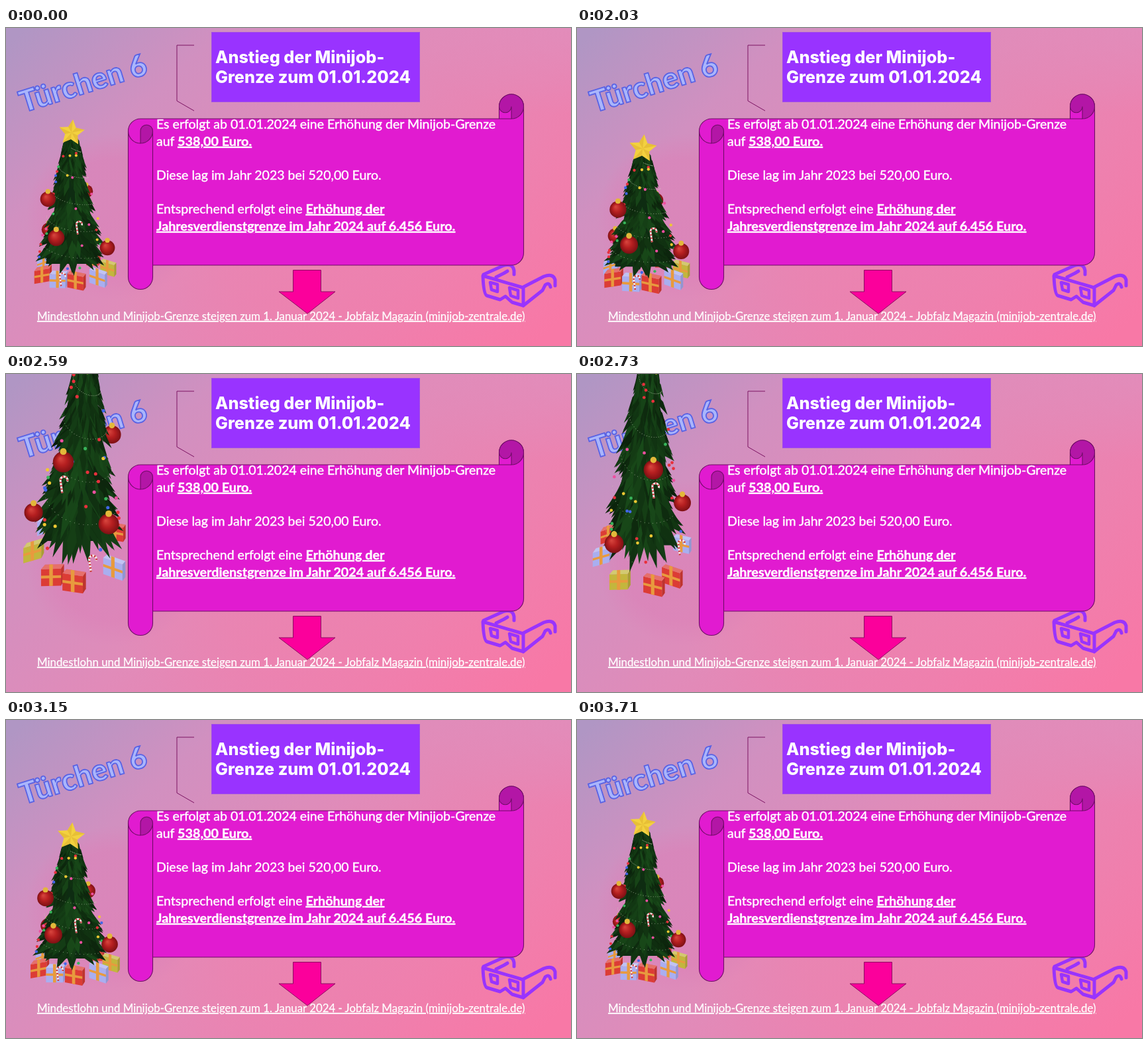
These frames come from a looping animation (853x480 px, 5.18 s). An HTML page with a canvas:

```html
<!DOCTYPE html>
<html lang="de">
<head>
<meta charset="utf-8">
<title>Türchen 6</title>
<style>
html, body { margin: 0; width: 100%; height: 100%; overflow: hidden; }
body {
  position: relative;
  background:
    radial-gradient(ellipse 135px 125px at 165px 285px, #dc7fb788 70%, #dc7fb700),
    radial-gradient(ellipse 250px 150px at 410px 370px, #f07fac66 30%, #f07fac00),
    radial-gradient(ellipse 260px 130px at 853px 0, #dd92c088, #dd92c000),
    linear-gradient(138deg, #b096c4 2%, #d190c0 24%, #e18bb9 48%, #ec82b0 70%, #f878a6 96%);
}
svg, canvas { position: absolute; left: 0; top: 0; width: 853px; height: 480px; }
text { fill: #fff; font-family: Lato, "Open Sans", sans-serif; white-space: pre; }
.title text { font: 800 25.2px Inter, sans-serif; }
.body { font-size: 19.55px; stroke: #fff; stroke-width: 0.4; }
.key { font-size: 19.75px; font-weight: 700; }
.key, .link { text-decoration: underline; text-decoration-skip-ink: none; }
.link { font-size: 16.83px; stroke: #fff; stroke-width: 0.25; }
.door { font-size: 45px; font-weight: 800; fill: #a9b5fc; stroke: #5862e4; stroke-width: 1.8; }
</style>
</head>
<body>
<svg viewBox="0 0 853 480">
  <text class="door" transform="translate(26 128) rotate(-17.3)">Türchen 6</text>
  <path d="M284 26H258V110L284 125" fill="none" stroke="#7c1463"/>
  <g class="title">
    <rect x="310.5" y="6.5" width="314" height="105" fill="#9933ff" stroke="#a04de6"/>
    <text x="316" y="53">Anstieg der Minijob-</text>
    <text x="316" y="82.5">Grenze zum 01.01.2024</text>
  </g>
  <g fill="none" stroke="#9933ff" stroke-width="5" stroke-linejoin="round" stroke-linecap="round">
    <path d="M720 374L781 392V419L764 414L754 405L746 410L726 404Q721 402 720 374Z"/>
    <path d="M781 391L812 375Q826 370 829 380V389M781 419L810 396L814 388Q820 383 822 391"/>
    <path d="M721 372L750 359Q765 354 767 366V372M740 376L752 370L757 367"/>
    <path d="M731 384L742 387V398L733 395ZM760 392L773 396V408L762 404Z" stroke-width="4.5"/>
  </g>
  <g stroke="#6f0d66" stroke-width="1.1">
    <path fill="#e11bd0" d="M184.5 155.5a18.5 18.5 0 0 1 18.5-18.5H744.5V118.5a18.5 18.5 0 0 1 37 0V339.5a18.5 18.5 0 0 1-18.5 18.5H221.5V376a18.5 18.5 0 0 1-37 0Z"/>
    <path fill="none" d="M184.5 155.5a18.5 18.5 0 0 0 18.5 18.5M221.5 155.5V358M744.5 137H763"/>
    <path fill="#b316a6" d="M203 155.5a9.25 9.25 0 0 1 18.5 0a18.5 18.5 0 0 1-18.5 18.5Z"/>
    <path fill="#b316a6" d="M744.5 118.5a18.5 18.5 0 0 1 37 0a18.5 18.5 0 0 1-18.5 18.5V118.5a9.25 9.25 0 0 1-18.5 0Z"/>
  </g>
  <g class="body">
    <text x="227" y="152">Es erfolgt ab 01.01.2024 eine Erhöhung der Minijob-Grenze</text>
    <text x="227" y="178">auf <tspan class="key">538,00 Euro.</tspan></text>
    <text x="227" y="229">Diese lag im Jahr 2023 bei 520,00 Euro.</text>
    <text x="227" y="280">Entsprechend erfolgt eine <tspan class="key">Erhöhung der</tspan></text>
    <text x="227" y="306" class="key">Jahresverdienstgrenze im Jahr 2024 auf 6.456 Euro.</text>
  </g>
  <path d="M433.5 365.5H475.5V398H497L455 431L412 398H433.5Z" fill="#fb009b" stroke="#8d0c62"/>
  <text class="link" x="47" y="441">Mindestlohn und Minijob-Grenze steigen zum 1. Januar 2024 - Jobfalz Magazin (minijob-zentrale.de)</text>
</svg>
<canvas width="853" height="480"></canvas>
<script>
const ctx = document.querySelector('canvas').getContext('2d');
const LOOP = 5180, START = 1610, STEP = 70, END = 3710, RAD = Math.PI / 180;

// time, top x, top y, base x, base y, half width, tilt, yaw
const POSES = [
  [1540, 99, 158, 100, 356, 53, 18, 0],
  [1990, 99, 181, 100, 360, 57, 18, 2],
  [2100, 100, 170, 100, 356, 57, 20, 25],
  [2310, 103, 41, 102, 310, 62, 32, 140],
  [2590, 121, -45, 107, 252, 67, 50, 180],
  [2870, 95, 0, 90, 282, 56, 45, 285],
  [3150, 98, 176, 100, 360, 57, 18, 357],
  [3240, 99, 182, 100, 360, 58, 18, 360],
  [3710, 99, 158, 100, 356, 53, 18, 360]
];

// Cubic Hermite through the pose table.
function poseAt(t) {
  const last = POSES.length - 1;
  let i = 0;
  while (i < last - 1 && t >= POSES[i + 1][0]) i++;
  const a = POSES[i], b = POSES[i + 1], span = b[0] - a[0], s = (t - a[0]) / span;
  const slope = (n, k) => n < 1 || n >= last ? 0 :
    (POSES[n + 1][k] - POSES[n - 1][k]) / (POSES[n + 1][0] - POSES[n - 1][0]);
  const mix = k => (1 + 2 * s) * (1 - s) ** 2 * a[k] + s * s * (3 - 2 * s) * b[k] +
    span * (s * (1 - s) ** 2 * slope(i, k) + s * s * (s - 1) * slope(i + 1, k));
  const [topX, topY, baseX, baseY, width, tilt, yaw] = [1, 2, 3, 4, 5, 6, 7].map(mix);
  return { topX, topY, baseX, baseY, width, tilt, yaw };
}

let seed = 24;
const rnd = () => (seed = seed * 16807 % 2147483647) / 2147483647;
const radiusAt = u => Math.max(u, 0) ** 0.7;

const branches = Array.from({ length: 420 }, (_, i) => ({
  u: 1 - 0.94 * i / 420, angle: rnd() * 360, reach: 0.75 + 0.35 * rnd(), tone: rnd()
}));
const bulbColors = ['#e8303c', '#4166e8', '#f0c832', '#38b45a', '#ee4fa0', '#e8303c'];
const bulbs = Array.from({ length: 60 }, (_, i) => ({
  u: 0.1 + 0.85 * rnd() ** 0.8, angle: rnd() * 360, color: bulbColors[i % 6]
}));
// angle, height
const balls = [[-75, 0.49], [-30, 0.73], [85, 0.87], [145, 0.5], [225, 0.8]];
const canes = [[15, 0.65], [-15, 1.02], [150, 0.6], [200, 0.95]];
const [RED, LILAC, OLIVE] = ['#dc3c35', '#a9aef0', '#c3b63d'];
const gifts = [[-60, RED], [-25, LILAC], [5, RED], [45, LILAC], [95, OLIVE], [145, RED], [175, RED], [235, LILAC]];

function project(p, angle, u, r) {
  const a = (angle + p.yaw) * RAD, depth = Math.cos(a);
  return {
    x: p.topX + (p.baseX - p.topX) * u + Math.sin(a) * r * p.width,
    y: p.topY + (p.baseY - p.topY) * u + depth * r * p.tilt,
    depth
  };
}

function poly(points, fill) {
  ctx.beginPath();
  points.forEach(([x, y]) => ctx.lineTo(x, y));
  ctx.closePath();
  ctx.fillStyle = fill;
  ctx.fill();
}

function dot(x, y, r, fill) {
  ctx.beginPath();
  ctx.arc(x, y, r, 0, 7);
  ctx.fillStyle = fill;
  ctx.fill();
}

function drawGift(p, angle, color) {
  const { x, y, depth } = project(p, angle, 1.04, 1);
  const s = p.width * (0.2 + 0.03 * depth);
  ctx.save();
  ctx.translate(x, y);
  ctx.transform(1, 0.35 * Math.sin((angle + p.yaw + 30) * RAD), 0, 1, 0, 0);
  const lid = [[-s, -s * 0.7], [-s * 0.6, -s * 1.15], [s * 1.3, -s * 1.15], [s, -s * 0.7]];
  const side = [[s, -s * 0.7], [s * 1.3, -s * 1.15], [s * 1.3, s * 0.5], [s, s]];
  ctx.fillStyle = color;
  ctx.fillRect(-s, -s * 0.7, s * 2, s * 1.7);
  poly(lid, color);
  poly(lid, '#ffffff44');
  poly(side, color);
  poly(side, '#00000022');
  ctx.fillStyle = '#e89a3e';
  ctx.fillRect(-s * 0.18, -s * 1.15, s * 0.36, s * 2.15);
  ctx.fillRect(-s, -s * 0.05, s * 2, s * 0.28);
  ctx.restore();
}

function drawBall(p, [angle, u]) {
  const { x, y, depth } = project(p, angle, u, radiusAt(u) + 0.1);
  const r = p.width * 0.212 * (1 + 0.13 * depth);
  const shade = ctx.createRadialGradient(x - r * 0.3, y - r * 0.35, 0, x, y, r);
  shade.addColorStop(0, '#d9473f');
  shade.addColorStop(0.5, '#b51f20');
  shade.addColorStop(1, '#7d1014');
  dot(x, y, r, shade);
  dot(x, y - r, r * 0.32, '#e3b83a');
}

function drawBranch(p, b) {
  const r = radiusAt(b.u) * b.reach;
  const tip = project(p, b.angle, b.u, r);
  const root = project(p, b.angle, b.u - 0.13, r * 0.3);
  const dx = tip.x - root.x, dy = tip.y - root.y, len = Math.hypot(dx, dy) || 1;
  const w = p.width * (0.045 + 0.07 * b.u);
  const nx = -dy / len * w, ny = dx / len * w;
  const mx = root.x + dx * 0.5, my = root.y + dy * 0.5;
  const light = 8 + 9 * b.tone + 3 * tip.depth;
  poly([[root.x, root.y], [mx + nx, my + ny], [tip.x, tip.y], [mx - nx, my - ny]], `hsl(121 50% ${light}%)`);
}

function drawCane(p, [angle, u]) {
  const { x, y, depth } = project(p, angle, u, radiusAt(u) + 0.05);
  if (depth < 0) return;
  const s = p.width * 0.08;
  ctx.beginPath();
  ctx.moveTo(x - s * 0.5, y + s * 2.6);
  ctx.lineTo(x - s, y - s);
  ctx.arc(x, y - s, s, Math.PI, 0.4);
  ctx.lineWidth = s * 0.6;
  ctx.strokeStyle = '#f3e6e6';
  ctx.stroke();
  ctx.setLineDash([2, 3]);
  ctx.strokeStyle = '#c8323a';
  ctx.stroke();
  ctx.setLineDash([]);
}

function drawStar(p) {
  const r = p.width * 0.38, turn = Math.cos(p.yaw * RAD);
  const squash = Math.sign(turn) * Math.max(0.22, Math.abs(turn));
  const pts = Array.from({ length: 10 }, (_, i) => {
    const a = (i * 36 - 84) * RAD, len = i % 2 ? r * 0.5 : r;
    return [p.topX + Math.cos(a) * len * squash, p.topY + Math.sin(a) * len];
  });
  poly(pts, '#f3d13f');
  pts.forEach((pt, i) => {
    if (i % 2) poly([[p.topX, p.topY], pt, pts[(i + 1) % 10]], '#d9ab2c77');
  });
}

function drawTree(p) {
  ctx.clearRect(0, 0, 853, 480);
  const facing = angle => Math.cos((angle + p.yaw) * RAD);
  const isFront = angle => facing(angle) > -0.25;

  [...gifts].sort((a, b) => facing(a[0]) - facing(b[0])).forEach(g => drawGift(p, ...g));
  branches.filter(b => !isFront(b.angle)).forEach(b => drawBranch(p, b));
  balls.filter(b => !isFront(b[0])).forEach(b => drawBall(p, b));
  const { topX, topY, baseX, baseY, width } = p;
  const midX = (topX + baseX) / 2, midY = (topY + baseY) / 2;
  poly([[topX, topY], [midX + width * 0.45, midY], [baseX + width * 0.75, baseY],
    [baseX - width * 0.75, baseY], [midX - width * 0.45, midY]], '#0e2c12');
  branches.filter(b => isFront(b.angle)).forEach(b => drawBranch(p, b));

  for (let i = 0; i < 230; i++) {
    const u = 0.1 + 0.86 * i / 230;
    const { x, y, depth } = project(p, i * 7, u, radiusAt(u));
    if (depth > 0) dot(x, y, 0.55, '#c9d0b8b0');
  }
  for (const b of bulbs) {
    const { x, y, depth } = project(p, b.angle, b.u, radiusAt(b.u));
    if (depth > -0.1) dot(x, y, p.width * 0.038, b.color);
  }
  canes.forEach(c => drawCane(p, c));
  balls.filter(b => isFront(b[0])).forEach(b => drawBall(p, b));
  drawStar(p);
}

let shown = -1;
function tick() {
  const t = performance.now() % LOOP;
  const held = t < START ? POSES[0][0]
    : Math.min(END, START + Math.floor((t - START) / STEP) * STEP);
  if (held !== shown) drawTree(poseAt(shown = held));
  requestAnimationFrame(tick);
}
tick();
</script>
</body>
</html>
```
